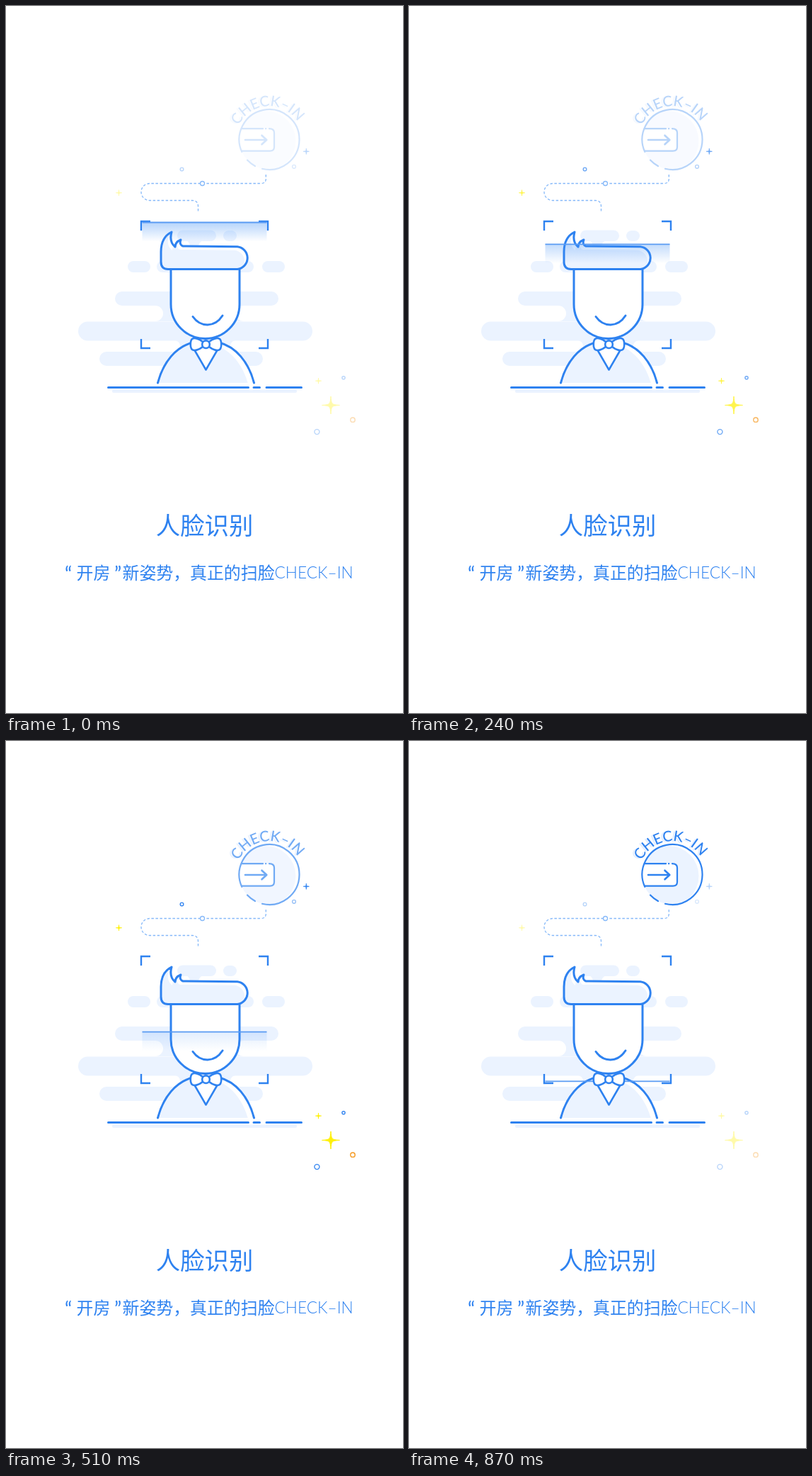
Animation of 561 by 998 pixels, one loop 0.9 s. Source, as an HTML page:

```html
<!DOCTYPE html>
<html lang="zh-CN">
<head>
<meta charset="utf-8">
<title>人脸识别</title>
<style>
  html, body { margin: 0; height: 100%; overflow: hidden; background: #fff; }
  svg { display: block; width: 100vw; height: 100vh; }
  .line { fill: none; stroke: #2e82f0; stroke-width: 3; stroke-linecap: round; stroke-linejoin: round; }
  .thin { stroke-width: 2.2; }
  .white { fill: #fff; }
  .pale { fill: #ebf3ff; }
  text { fill: #2e82f0; font-family: "Noto Sans CJK SC", "Noto Sans CJK", sans-serif; }
  .latin { font-family: Lato, sans-serif; }
  .quote { font-size: 28px; }
  .arc { font-size: 20.5px; font-weight: 500; text-anchor: middle; }
</style>
</head>
<body>
<svg viewBox="0 0 561 998">
  <defs>
    <linearGradient id="glow" x2="0" y2="1">
      <stop stop-color="#3f8ff5" stop-opacity=".38"/>
      <stop offset="1" stop-color="#3f8ff5" stop-opacity="0"/>
    </linearGradient>
    <path id="hair" d="M219 347C219 333 224 324 234 319C231 330 234 336 239 340C239 335 242 332 247 330C245 335 247 338 250 339L327 339.700A16 16 0 0 1 327 371.500H229Q219 371.500 219 361Z"/>
    <path id="body" d="M214.500 532C222 503 240 481 264 475H301C325 481 343 503 350.500 532Z"/>
    <path id="ring" d="M324.700 188.500A47.300 47.300 0 0 1 419.300 188.500"/>
    <clipPath id="inHair"><use href="#hair"/></clipPath>
    <clipPath id="inBody"><use href="#body"/></clipPath>
    <clipPath id="inBadge"><circle cx="372" cy="188.500" r="42.500"/></clipPath>
  </defs>

  <!-- Cloud bands -->
  <g class="pale">
    <rect x="242" y="316.500" width="55" height="15.500" rx="7.750"/>
    <path d="M254 331H279Q272 333 272 340H260Q260 333 254 331Z"/>
    <rect x="307" y="317" width="19" height="15" rx="7.500"/>
    <rect x="172" y="360" width="32" height="16" rx="8"/>
    <rect x="213" y="360" width="137" height="16" rx="8"/>
    <rect x="362" y="360" width="32" height="16" rx="8"/>
    <rect x="154" y="403" width="231" height="20" rx="10"/>
    <path d="M211 423A11 11 0 0 1 211 445H336A11 11 0 0 1 336 423Z"/>
    <rect x="102" y="445.500" width="331" height="27" rx="13.500"/>
    <path d="M238 472A8 8 0 0 1 238 488H325A8 8 0 0 1 325 472Z"/>
    <rect x="132" y="488" width="231" height="20" rx="10"/>
    <rect x="150" y="541.500" width="261" height="4.500" rx="2"/>
  </g>

  <!-- Portrait -->
  <use href="#body" class="white"/>
  <g clip-path="url(#inBody)"><use href="#body" class="pale" x="-8" y="3"/></g>
  <path class="line" d="M214.500 532C222 503 240 481 264 475M301 475C325 481 343 503 350.500 532"/>
  <path class="line white" style="stroke-width:2.600;fill:#fff" d="M266 485L282.500 513.500L299 485"/>
  <path class="line" style="fill:#fff" d="M233 371V421A48.500 48.500 0 0 0 330 421V371Z"/>
  <path class="line" d="M264 438.500C275 454 295 454 306 437"/>
  <use href="#hair" class="white"/>
  <g clip-path="url(#inHair)"><use href="#hair" class="pale" x="-4" y="5"/></g>
  <use href="#hair" class="line"/>
  <path class="line" d="M144.500 538.500H342.500M350 538.500H358.500M368 538.500H417.500"/>

  <!-- Scanner -->
  <path class="line" style="stroke-width:2.400;stroke-linecap:butt;stroke-linejoin:miter"
    d="M191 317V304H204M357 304H370V317M370 470V483H357M204 483H191V470"/>
  <g id="scan">
    <rect id="beam" x="192.500" width="176" height="27" fill="url(#glow)"/>
    <path d="M192.500 0H368.500" stroke="#5a9bf3" stroke-width="1.800"/>
  </g>

  <!-- Bow tie -->
  <g class="line" style="stroke-width:2.600;fill:#fff">
    <path id="wing" d="M278 474C272 469 266 468 263 470C260 473 260 482 263 485C266 487 272 486 278 481Z"/>
    <use href="#wing" transform="translate(565) scale(-1 1)"/>
    <circle cx="282.500" cy="477.700" r="5.300"/>
  </g>

  <!-- Route -->
  <path fill="none" stroke="#86b9f9" stroke-width="1.300" stroke-dasharray="3.500 2.500"
    d="M367.300 238V244Q367.300 250.500 360 250.500H203A12 12 0 0 0 203 274.500H263Q271.500 274.500 271.500 283V292"/>
  <circle cx="277.500" cy="250.500" r="3" fill="#fff" stroke="#86b9f9" stroke-width="1.300"/>

  <!-- Badge -->
  <g id="badge">
    <g clip-path="url(#inBadge)">
      <circle class="pale" cx="367" cy="190.500" r="42.500"/>
      <rect class="white" x="320" y="173.200" width="59" height="31.500" rx="6"/>
    </g>
    <g class="line thin">
      <path d="M333.200 205.800A42.500 42.500 0 1 1 362 229.800M352 226A42.500 42.500 0 0 1 341 217.500"/>
      <path d="M333 173.200H363M367 173.200H367.200M372 173.200Q379 173.200 379 179V199Q379 204.700 373 204.700H333"/>
      <path style="stroke-width:2.600" d="M338 189H368M361.500 182.700L368.300 189L361.500 195.300"/>
    </g>
    <text class="latin arc" transform="translate(-3 1)" style="fill:#e3eefe"><textPath href="#ring" startOffset="48%">CHECK–IN</textPath></text>
    <text class="latin arc"><textPath href="#ring" startOffset="48%">CHECK–IN</textPath></text>
  </g>

  <g id="sparkles"></g>

  <!-- Captions -->
  <text x="211.800" y="746" font-size="34.400" font-weight="500">人脸识别</text>
  <g font-size="23.900">
    <text class="latin quote" x="83" y="812">“</text>
    <text x="99.500" y="809">开房</text>
    <text class="latin quote" x="153" y="812">”</text>
    <text x="164.500" y="809">新姿势，真正的扫脸</text>
    <text class="latin" x="379.500" y="808" font-size="22.700" font-weight="300">CHECK–IN</text>
  </g>
</svg>
<script>
  const LOOP = 900, STEP = 30;
  const BLUE = '#2e82f0', YELLOW = '#fff000', ORANGE = '#f5981e';
  const byId = id => document.getElementById(id);
  const smooth = p => p * p * (3 - 2 * p);

  // Four thin arms with concave sides
  function star(x, y, r, color) {
    const c = r * 0.08;
    return `<path transform="translate(${x} ${y})" fill="${color}" stroke="${color}" stroke-linejoin="round"
      d="M0 ${-r}C${c} ${-c} ${c} ${-c} ${r} 0C${c} ${c} ${c} ${c} 0 ${r}C${-c} ${c} ${-c} ${c} ${-r} 0C${-c} ${-c} ${-c} ${-c} 0 ${-r}Z"/>`;
  }
  const dot = (x, y, r, color, opacity = 1) =>
    `<circle cx="${x}" cy="${y}" r="${r}" fill="none" stroke="${color}" stroke-width="1.4" opacity="${opacity}"/>`;

  byId('sparkles').innerHTML = [
    star(159.5, 263.7, 4, YELLOW),
    star(424.3, 205.3, 4, BLUE),
    star(441.5, 529.2, 4, YELLOW),
    star(459, 563.5, 12.5, YELLOW),
    dot(248.5, 230.4, 2.3, BLUE),
    dot(407, 226.8, 2.4, BLUE, 0.5),
    dot(477, 524.8, 2.1, BLUE),
    dot(490, 584.2, 3.2, ORANGE),
    dot(439.4, 601.1, 3.5, BLUE)
  ].join('');

  function draw(now) {
    const p = Math.floor(now % LOOP / STEP) * STEP / LOOP;
    const progress = smooth(p);
    const pulse = smooth(1 - Math.abs(2 * p - 1));
    byId('scan').setAttribute('transform', `translate(0 ${305.5 + 175.5 * progress})`);
    byId('beam').setAttribute('opacity', 1 - progress);
    byId('badge').setAttribute('opacity', 0.2 + 0.8 * progress);
    byId('sparkles').setAttribute('opacity', 0.33 + 0.67 * pulse);
    requestAnimationFrame(draw);
  }
  requestAnimationFrame(draw);
</script>
</body>
</html>
```
